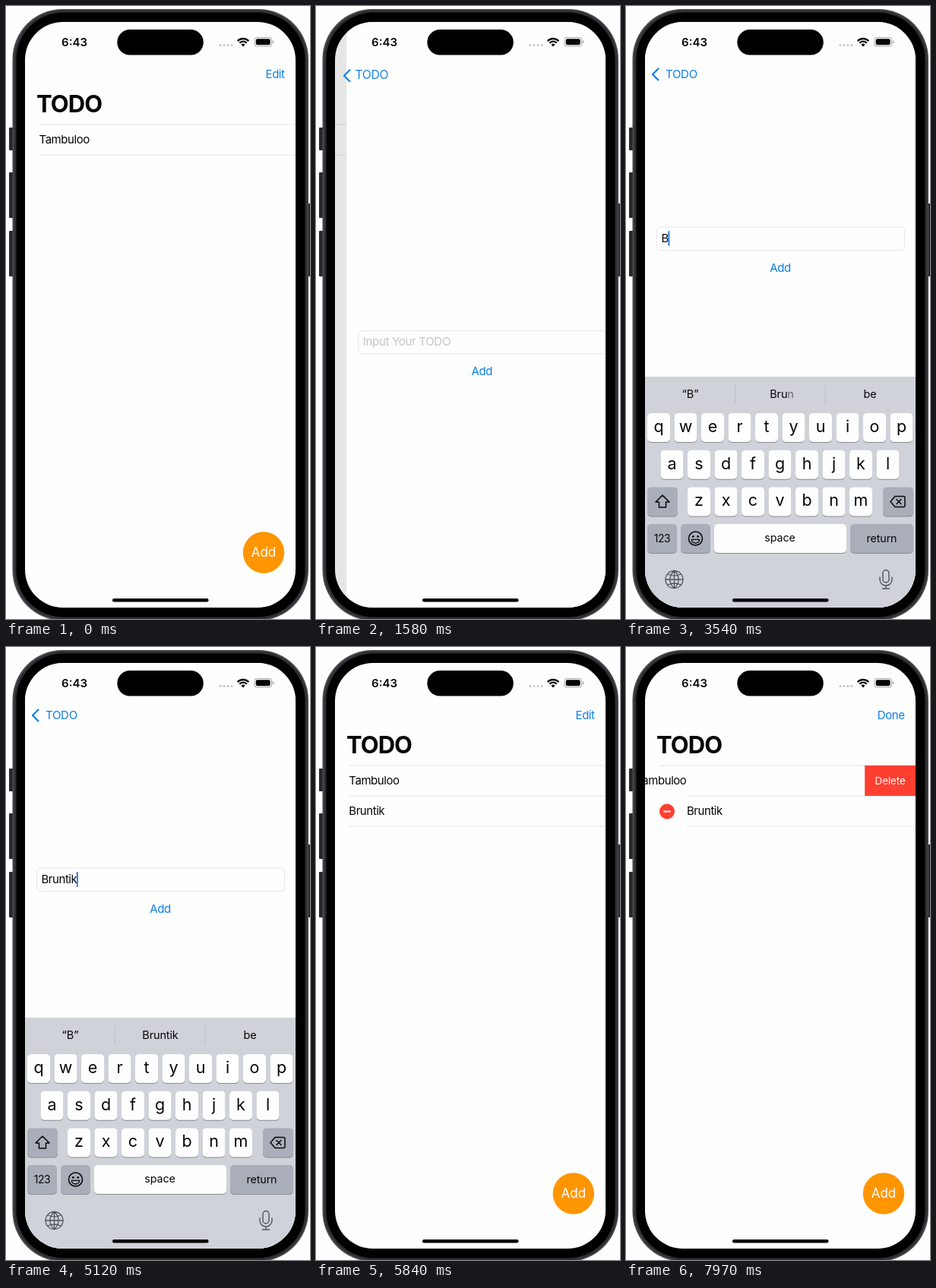
An HTML page with a canvas for the animation above (8000 ms loop, 400 px wide and 807 px high).

```html
<!DOCTYPE html>
<html lang="en">
<head>
<meta charset="utf-8">
<title>To-do list</title>
<style>
html, body { margin: 0; width: 100%; height: 100%; overflow: hidden; background: #fefefe; }
canvas { display: block; width: 400px; height: 807px; }
</style>
</head>
<body>
<canvas id="stage"></canvas>
<script>
const canvas = document.getElementById('stage');
const ctx = canvas.getContext('2d');
const ratio = window.devicePixelRatio || 1;
canvas.width = 400 * ratio;
canvas.height = 807 * ratio;

const LOOP = 8000;
const PAPER = '#fefefe', INK = '#060607', BLUE = '#0a7fe8', RED = '#ff3f30', LINE = '#e6e6ee';
const SCREEN = { x: 25, y: 21, w: 356, h: 771 };
const FIRST = 'Tambuloo', SECOND = 'Bruntik';
const TIME = { push: 1170, focus: 2063, keyboard: 2164, type: 3420, complete: 5050, pop: 5190, edit: 6350, reveal: 7520 };

const clamp = v => Math.max(0, Math.min(1, v));
const mix = (a, b, p) => a + (b - a) * p;
// Critically damped spring, from 0 to 1.
const spring = (t, start, speed) => {
  const x = Math.max(0, t - start) / 1000 * speed;
  return 1 - (1 + x) * Math.exp(-x);
};

function setFont(size, weight = 400, tracking = -0.03) {
  ctx.font = `${weight} ${size}px Inter, sans-serif`;
  ctx.letterSpacing = tracking * size + 'px';
}
function text(str, x, y, { size = 15, color = INK, weight, align = 'left', tracking } = {}) {
  setFont(size, weight, tracking);
  ctx.textAlign = align;
  ctx.textBaseline = 'middle';
  ctx.fillStyle = color;
  ctx.fillText(str, x, y);
}
function box(x, y, w, h, r, color) {
  ctx.beginPath();
  ctx.roundRect(x, y, w, h, r);
  ctx.fillStyle = color;
  ctx.fill();
}
function disc(x, y, r, color) {
  ctx.beginPath();
  ctx.arc(x, y, r, 0, 7);
  ctx.fillStyle = color;
  ctx.fill();
}
function stroke(path, color, width, fill) {
  const p = new Path2D(path);
  ctx.lineWidth = width;
  ctx.lineCap = ctx.lineJoin = 'round';
  ctx.strokeStyle = color;
  if (fill) { ctx.fillStyle = fill; ctx.fill(p); }
  ctx.stroke(p);
}
function faded(alpha, draw) {
  ctx.save();
  ctx.globalAlpha *= clamp(alpha);
  draw();
  ctx.restore();
}
function shifted(x, y, draw) {
  ctx.save();
  ctx.translate(x, y);
  draw();
  ctx.restore();
}

function phoneBody() {
  [[160, 30], [219, 60], [296, 60]].forEach(([y, h]) => box(4, y, 6, h, 1, '#29292c'));
  box(397, 260, 4, 96, 1, '#29292c');
  box(8.5, 4, 389.5, 805, 66, '#4a4a4e');
  box(10.5, 5.5, 386, 802, 65, '#2f2f33');
  box(13.5, 8.5, 380, 796, 62, '#000');
  box(SCREEN.x, SCREEN.y, SCREEN.w, SCREEN.h, 50, PAPER);
}

function statusBar() {
  text('6:43', 90, 48, { weight: 600, align: 'center', tracking: 0 });
  box(146.3, 31, 113.5, 33.6, 16.8, '#000');
  for (let i = 0; i < 4; i++) disc(282 + i * 5, 51.5, 1.5, '#c4c4c8');
  ctx.strokeStyle = INK;
  ctx.lineWidth = 2.3;
  ctx.lineCap = 'butt';
  [10, 6.3].forEach(r => {
    ctx.beginPath();
    ctx.arc(312, 53, r, -Math.PI * 0.76, -Math.PI * 0.24);
    ctx.stroke();
  });
  ctx.beginPath();
  ctx.moveTo(312, 53.5);
  ctx.arc(312, 53, 3.4, -Math.PI * 0.76, -Math.PI * 0.24);
  ctx.fillStyle = INK;
  ctx.fill();
  box(326.5, 41, 23.5, 12.5, 4, '#a9a9ac');
  box(327.5, 42, 21.5, 10.5, 3.2, PAPER);
  box(328.7, 43.2, 19, 8.1, 2.2, INK);
  box(350.8, 45.3, 1.5, 4, 1, '#a9a9ac');
}

function listPage(editing, reveal, hasSecond) {
  const separator = (x, y) => box(x, y, 381 - x, 1, 0, LINE);
  const minus = (x, y) => faded(editing, () => {
    disc(x, y, 10, RED);
    box(x - 5, y - 1, 10, 2, 1, PAPER);
  });
  const indent = 36.5 * editing, slide = -67 * reveal;
  separator(43.5, 155.5);
  [FIRST, SECOND].slice(0, hasSecond ? 2 : 1).forEach((name, i) => {
    const y = 176.5 + i * 40, dx = i ? 0 : slide;
    minus(17.5 + indent + dx, y);
    text(name, 43.5 + indent + dx, y);
    separator(43.5 + indent, y + 19);
  });
  if (reveal > 0) {
    const x = 381 + slide;
    box(x, 156, -slide + 1, 40, 0, RED);
    text('Delete', x + 33.5, 176.5, { size: 13.3, color: '#fff', align: 'center', tracking: 0 });
  }
  disc(339, 719.5, 27.2, '#ff9500');
  text('Add', 339, 720, { size: 17, color: '#fff', align: 'center', tracking: 0 });
}

function formPage(t, lift) {
  const y = mix(442.5, 306, lift);
  box(25, 21, SCREEN.w, SCREEN.h, 0, PAPER);
  ctx.beginPath();
  ctx.roundRect(40.5, y - 15, 326, 30.5, 5);
  ctx.lineWidth = 1;
  ctx.strokeStyle = LINE;
  ctx.stroke();

  const typed = t < TIME.type ? '' : t < TIME.complete ? SECOND[0] : SECOND;
  if (typed) text(typed, 46.5, y);
  else text('Input Your TODO', 46.5, y, { color: '#c5c5c8', tracking: -0.02 });

  const since = Math.max(...[TIME.focus, TIME.type, TIME.complete].filter(s => s <= t), 0);
  if (since && (t - since) % 1000 < 600) {
    setFont(15);
    box(46 + ctx.measureText(typed).width, y - 10, 2, 20, 1, '#2f7fe0');
  }
  text('Add', 203, y + 39, { color: BLUE, align: 'center' });
}

function prediction(t, before, after, x) {
  const opts = { size: 14.5, tracking: -0.01 };
  if (t < TIME.type) return text(before, x, 511.5, { ...opts, align: 'center' });
  const letters = [...after].map((ch, i) => {
    setFont(opts.size, 400, opts.tracking);
    return { ch, alpha: clamp((t - TIME.type - i * 30) / 60), width: ctx.measureText(ch).width };
  });
  let pen = x - letters.reduce((sum, l) => sum + l.width * l.alpha, 0) / 2;
  letters.forEach(l => {
    faded(l.alpha, () => text(l.ch, pen, 511.5, opts));
    pen += l.width * l.alpha;
  });
}

function keyboard(t) {
  const upper = t < TIME.type, GREY = '#a9aeb9', WHITE = '#fefefe', ICON = '#50555c';
  const key = (x, y, w, color) => {
    box(x, y + 1, w, 38, 5, '#898b90');
    box(x, y, w, 38, 5, color);
  };
  box(25, 488, 356, 310, 0, '#cfd2d9');
  prediction(t, 'I', `“${SECOND[0]}”`, 84.5);
  prediction(t, 'The', SECOND, 203);
  prediction(t, 'I’m', 'be', 321);
  [143, 261.5].forEach(x => box(x, 499, 1, 24, 0, '#bcbfc7'));

  ['qwertyuiop', 'asdfghjkl', 'zxcvbnm'].forEach((row, r) => {
    const y = 536 + r * 48.7, left = [43, 60.5, 96][r];
    [...row].forEach((ch, i) => {
      const x = left + i * 35.5;
      key(x - 15, y, 30, WHITE);
      text(upper ? ch.toUpperCase() : ch, x, y + 18.5,
        { size: upper ? 20 : 21.5, align: 'center', tracking: 0 });
    });
  });

  key(28, 633.4, 40, upper ? WHITE : GREY);
  stroke('M48 644L57 653H52.5V660H43.5V653H39Z', INK, 1.5, upper ? INK : null);
  key(338, 633.4, 40, GREY);
  stroke('M348 652.5L354 645.5H365Q367 645.5 367 647.5V657.5Q367 659.5 365 659.5H354Z' +
    'M356 649.5L362 655.5M362 649.5L356 655.5', INK, 1.5);

  key(28, 682, 39, GREY);
  text('123', 47.5, 701.5, { size: 14, align: 'center' });
  key(72, 682, 39, GREY);
  stroke('M82.5 701a9 9 0 1 0 18 0a9 9 0 1 0 -18 0', INK, 1.5);
  disc(88.3, 698.3, 1.4, INK);
  disc(94.7, 698.3, 1.4, INK);
  stroke('M86.3 702.3H96.7C96.5 708.6 86.5 708.6 86.3 702.3Z', INK, 1.3);
  key(116, 682, 174, WHITE);
  text('space', 202.5, 701, { size: 14.3, align: 'center', tracking: -0.01 });
  key(295, 682, 83, GREY);
  text('return', 336.5, 701.5, { size: 14.3, align: 'center', tracking: -0.01 });

  stroke('M52 755a11.5 11.5 0 1 0 23 0a11.5 11.5 0 1 0 -23 0M52 755H75M63.5 743.5V766.5' +
    'M63.5 743.5C56 750 56 760 63.5 766.5C71 760 71 750 63.5 743.5' +
    'M55 748Q63.5 752 72 748M55 762Q63.5 758 72 762', ICON, 1.3);
  stroke('M338 746.5a4 4 0 0 1 8 0V755a4 4 0 0 1 -8 0Z' +
    'M334 752V755a8 8 0 0 0 16 0V752M342 763V767M337.5 767H346.5', ICON, 1.4);
}

function navigationBar(open, editing) {
  const x = mix(40, 52, open), y = mix(131, 90, open);
  const size = mix(31, 15, open);
  faded((1 - open) ** 2, () => text('TODO', x, y, { size, weight: 700 }));
  faded(open, () => {
    text('TODO', x, y, { size, color: BLUE, tracking: -0.02 });
    shifted(45 * (1 - open), y - 90, () => stroke('M42.5 82.5L35 90L42.5 97.5', BLUE, 2.2));
  });
  const action = { color: BLUE, align: 'right' };
  const visible = 1 - open * 1.05;
  faded(visible * (1 - editing), () => text('Edit', 366.5, 90, action));
  faded(visible * editing, () => text('Done', 366.5, 90, action));
}

function render(t) {
  const open = t < TIME.pop ? spring(t, TIME.push, 12) : 1 - spring(t, TIME.pop, 13);
  const lift = spring(t, TIME.focus, 14), raised = spring(t, TIME.keyboard, 14);
  const editing = spring(t, TIME.edit, 16), reveal = spring(t, TIME.reveal, 18);

  ctx.setTransform(ratio, 0, 0, ratio, 0, 0);
  ctx.fillStyle = PAPER;
  ctx.fillRect(0, 0, 400, 807);
  phoneBody();

  ctx.save();
  ctx.beginPath();
  ctx.roundRect(SCREEN.x, SCREEN.y, SCREEN.w, SCREEN.h, 50);
  ctx.clip();
  shifted(-0.3 * SCREEN.w * open, 0, () => listPage(editing, reveal, t >= TIME.pop));
  if (open > 0.002) {
    faded(0.1 * open, () => box(25, 21, SCREEN.w, SCREEN.h, 0, '#000'));
    shifted(SCREEN.w * (1 - open), 0, () => {
      formPage(t, lift);
      if (raised > 0) shifted(0, 304 * (1 - raised), () => keyboard(t));
    });
  }
  navigationBar(open, editing);
  statusBar();
  box(140, 780, 126.5, 4.5, 2.2, '#000');
  ctx.restore();
}

const begin = performance.now();
function tick() {
  render((performance.now() - begin) % LOOP);
  requestAnimationFrame(tick);
}
tick();
</script>
</body>
</html>
```
